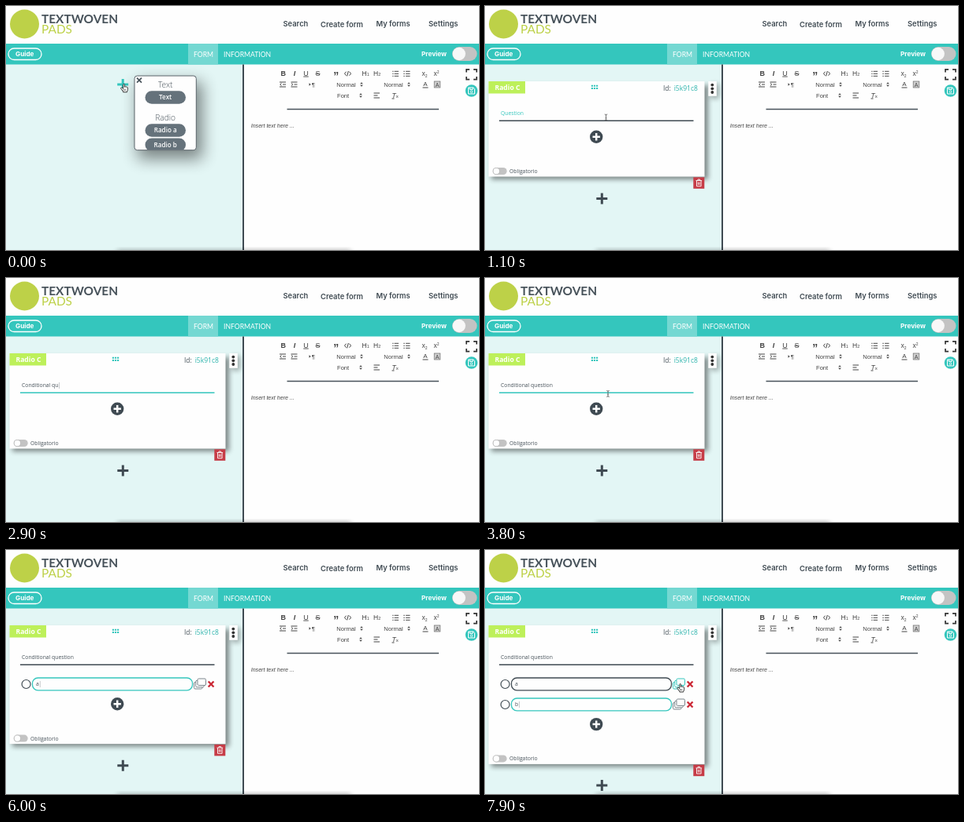
Recreate the animation shown at these times as an HTML page. Size 600 by 311 pixels, loop 8 s.

```html
<!DOCTYPE html>
<html lang="en">
<head>
<meta charset="utf-8">
<title>Form editor</title>
<style>
  html, body { margin: 0; width: 100%; height: 100%; overflow: hidden; background: #fefefe; }
  svg { display: block; width: 600px; height: 311px; }
  text { fill: #47525a; font-family: "Open Sans", sans-serif; white-space: pre; }
  .nav text { font: 600 9.4px Inter, sans-serif; fill: #3f4a52; }
  .bar text { fill: #fff; font-family: Lato, sans-serif; font-size: 8.6px; }
  .bar .bold { font: 700 8.2px Inter, sans-serif; }
  .tools text { font-family: "Liberation Sans", Arial, sans-serif; font-size: 7.6px; fill: #444; }
  .tools .mid { font-size: 9px; text-anchor: middle; }
  .tools path, #lines { fill: none; stroke: #444; stroke-width: 1; }
  .field { font-size: 6.8px; font-weight: 400; }
  .pill { fill: #fff; font: 600 8.1px "Open Sans", sans-serif; text-anchor: middle; }
  .group { font: 300 10.2px "Open Sans", sans-serif; text-anchor: middle; }
</style>
</head>
<body>
<svg viewBox="0 0 600 311" xmlns="http://www.w3.org/2000/svg">
  <defs>
    <filter id="soft" x="-50%" y="-50%" width="200%" height="200%"><feGaussianBlur stdDeviation="3"/></filter>
    <filter id="wide" x="-60%" y="-60%" width="220%" height="220%"><feGaussianBlur stdDeviation="10"/></filter>
    <clipPath id="menuClip"><rect x="163.5" y="89.5" width="77.5" height="93.7" rx="3"/></clipPath>
    <clipPath id="leftClip"><rect y="74" width="300" height="237"/></clipPath>
    <g id="hand">
      <path d="M-1.2,-4.4 q0,-1 .9,-1 t.9,1 V-1.6 q.8,-.8 1.5,0 q.9,-.6 1.4,.2 q1,-.3 1.1,.9 V1.6 q0,1.4 -.9,2.6 V5 H-1.2 V4.2 L-3.9,.6 q-.6,-1 .3,-1.4 q.8,-.2 1.5,.6 l.9,.8 Z" fill="#fff" stroke="#222" stroke-width=".9" stroke-linejoin="round"/>
      <path d="M.5,1 V3.4 M1.9,1 V3.4 M-.8,1 V3.4" stroke="#222" stroke-width=".5"/>
    </g>
    <path id="beam" d="M-1.7,-4 Q0,-4 0,-2.8 Q0,-4 1.7,-4 M0,-3 V3 M-1.7,4 Q0,4 0,2.8 Q0,4 1.7,4 M-.8,.8 H.8" fill="none" stroke="#555" stroke-width=".8"/>
    <g id="row">
      <circle cx="25.6" cy="171" r="5.5" fill="#fefefe" stroke="#3f4a52" stroke-width="1.2"/>
      <path d="M256.7,167.5 l6.8,7 m0,-7 l-6.8,7" stroke="#cb2936" stroke-width="2.3"/>
    </g>
    <g id="copy" fill="#fefefe" stroke-width="1">
      <rect x="238.5" y="168.5" width="10.5" height="8.5" rx="1.5"/>
      <rect x="240.7" y="166.3" width="10.5" height="8.5" rx="1.5"/>
      <rect x="243" y="164" width="10.5" height="8.5" rx="1.5"/>
    </g>
    <path id="sort" d="M-1.9,-.8 L0,-2.8 L1.9,-.8 Z M-1.9,.8 L0,2.8 L1.9,.8 Z" style="fill:#444;stroke:none"/>
    <path id="lines" d="M-1.4,-3 H4 M-1.4,0 H4 M-1.4,3 H4"/>
  </defs>

  <rect width="600" height="311" fill="#fefefe"/>
  <circle cx="23.5" cy="23" r="18.5" fill="#bdd148"/>
  <text x="45" y="22" style="font:700 15.4px Lato,sans-serif">TEXTWOVEN</text>
  <text x="45" y="35.2" style="font:400 15.4px Lato,sans-serif;fill:#bdd148">PADS</text>
  <g class="nav">
    <text x="351.5" y="25.7">Search</text>
    <text x="399" y="26.7">Create form</text>
    <text x="469.5" y="25.7">My forms</text>
    <text x="536" y="25.7">Settings</text>
  </g>

  <rect y="74" width="300" height="237" fill="#e3f6f5"/>
  <g class="bar">
    <rect y="48" width="600" height="26.5" fill="#34c6bd"/>
    <rect x="231" y="48" width="38" height="26.5" fill="#74d8d2"/>
    <rect x="3" y="54" width="42" height="14.5" rx="7.2" fill="none" stroke="#fff" stroke-width="1.3"/>
    <text class="bold" x="12" y="64.3">Guide</text>
    <text x="238" y="64.5">FORM</text>
    <text x="276" y="64.5">INFORMATION</text>
    <text class="bold" x="527" y="64.3">Preview</text>
    <rect x="566" y="52" width="31.5" height="18" rx="9" fill="#c3c3c3"/>
    <circle cx="574.7" cy="61" r="8.2" fill="#f8f8f8"/>
  </g>
  <rect x="300" y="74.5" width="2" height="237" fill="#3f4a52"/>

  <g class="tools">
    <text class="mid" x="351.7" y="89.3" font-weight="700">B</text>
    <text class="mid" x="366" y="89.3" font-style="italic" font-weight="700">I</text>
    <text class="mid" x="380.5" y="88.6" text-decoration="underline">U</text>
    <text class="mid" x="395.5" y="89.3" text-decoration="line-through">S</text>
    <text class="mid" x="418.7" y="93.5" style="font-size:14px;font-weight:700">”</text>
    <path d="M431.5,83.7 l-2,2.5 l2,2.5 M435.5,83.7 l2,2.5 l-2,2.5 M434.3,83 l-1.6,6.4"/>
    <text x="451.5" y="89.3" style="font-size:8.5px">H<tspan font-size="5.5">1</tspan></text>
    <text x="466" y="89.3" style="font-size:8.5px">H<tspan font-size="5.5">2</tspan></text>
    <use href="#lines" x="494" y="86.3"/>
    <use href="#lines" x="508.5" y="86.3"/>
    <path d="M490.2,83.3 h1.3 m-1.3,3 h1.3 m-1.3,3 h1.3 M504.3,83.3 h1.5 m-1.5,3 h1.5 m-1.5,3 h1.5"/>
    <text x="527.5" y="89" style="font-size:8.5px">x<tspan font-size="5" dy="1.5">2</tspan></text>
    <text x="542.5" y="89" style="font-size:8.5px">x<tspan font-size="5" dy="-3.5">2</tspan></text>
    <path d="M347,97 h8 m-4,3 h4 m-8,3 h8 M349.5,98.4 l-1.8,1.6 l1.8,1.6 M361.5,97 h8 m-4,3 h4 m-8,3 h8 M362,98.4 l1.8,1.6 l-1.8,1.6"/>
    <path d="M384.5,98.2 l2.2,1.8 l-2.2,1.8 Z" style="fill:#444;stroke:none"/>
    <text x="387.7" y="102.6" style="font-size:8px">¶</text>
    <text x="419.3" y="102.8">Normal</text><use href="#sort" x="451" y="100"/>
    <text x="479.3" y="102.8">Normal</text><use href="#sort" x="511" y="100"/>
    <text class="mid" x="532" y="102" style="font-size:8px">A</text><path d="M528.5,104 h7"/>
    <rect x="543.2" y="96" width="7.6" height="8" fill="#d0d0d0" stroke="#666" stroke-width=".7"/>
    <text class="mid" x="547" y="102.7" style="font-size:7px">A</text>
    <text x="420" y="116.8">Font</text><use href="#sort" x="450" y="114"/>
    <path d="M466.5,111 h7.5 m-7.5,3 h5 m-5,3 h7.5"/>
    <text x="489.5" y="117" font-style="italic" style="font-size:8.5px">T<tspan font-size="6" font-style="normal">x</tspan></text>
    <path d="M489.5,118 h3"/>
    <rect x="356.5" y="130.8" width="192.5" height="1.5" fill="#47525a"/>
    <text x="310.7" y="154.5" font-style="italic" style="font-size:7.1px">Insert text here ...</text>
    <path d="M584,84.5 v-3.7 h4 M593,80.8 h4 v3.7 M597,90 v3.7 h-4 M588,93.7 h-4 v-3.7" style="stroke:#333;stroke-width:1.7"/>
  </g>
  <circle cx="590.5" cy="108" r="7.8" fill="#34c6bd"/>
  <path d="M586.5,104 h6.3 l1.7,1.7 v6.3 h-8 Z M588.3,104 v2.4 h3.8 V104" fill="none" stroke="#fff"/>
  <circle cx="590.5" cy="109.3" r="1.3" fill="none" stroke="#fff" stroke-width=".8"/>

  <g id="menu">
    <path d="M148.2,93 v14 m-7,-7 h14" stroke="#34c6bd" stroke-width="3"/>
    <rect x="167" y="97" width="82" height="98" fill="#000" opacity=".46" filter="url(#wide)"/>
    <rect x="163" y="89" width="78.3" height="94.7" rx="3.5" fill="#fefefe" stroke="#5a646b"/>
    <g clip-path="url(#menuClip)"><g id="items"></g></g>
    <path d="M166,91.7 l6,6 m0,-6 l-6,6" stroke="#47525a" stroke-width="1.7"/>
  </g>

  <g id="card" clip-path="url(#leftClip)">
    <rect id="cardShade" x="8" y="101" width="275" fill="#000" opacity=".45" filter="url(#soft)"/>
    <rect x="286" y="99" width="11" height="19" fill="#000" opacity=".3" filter="url(#soft)"/>
    <rect id="cardBox" x="4.5" y="96" width="274" fill="#fefefe"/>
    <rect x="4.5" y="96" width="46.5" height="15.5" fill="#bdf05a"/>
    <text x="12.5" y="106.8" style="font:700 8.6px 'Open Sans',sans-serif;fill:#fff">Radio C</text>
    <path d="M134.8,101.8 h8.4 M134.8,105 h8.4" stroke="#34c6bd" stroke-width="2" stroke-dasharray="2.2 .9"/>
    <text x="226" y="107.6" style="font-size:8.4px">Id:</text>
    <text x="239.7" y="107.6" style="font-size:8.5px;fill:#2ab3ab">i5k91c8</text>
    <rect x="283.3" y="96" width="10.5" height="18.8" fill="#fefefe"/>
    <g fill="#333"><circle cx="288.3" cy="100.6" r="1.9"/><circle cx="288.3" cy="105.3" r="1.9"/><circle cx="288.3" cy="110" r="1.9"/></g>
    <text class="field" id="question" x="20" y="139.3"></text>
    <rect id="rule" x="18" y="145.5" width="246.5" height="1.5"/>
    <g id="rows"></g>
    <g id="lower">
      <circle id="addDot" cx="141.2" cy="166.7" r="8.2"/>
      <path d="M141.2,162 v9.4 m-4.7,-4.7 h9.4" stroke="#fff" stroke-width="2.5"/>
      <rect x="9.7" y="206" width="18" height="9" rx="4.5" fill="#c3c3c3"/>
      <circle cx="14.4" cy="210.5" r="4.1" fill="#fefefe" stroke="#aaa" stroke-width=".6"/>
      <text class="field" x="31" y="213">Obligatorio</text>
      <rect x="264.3" y="218.3" width="14" height="14.5" fill="#c63c47"/>
      <path d="M267.5,222.5 h7.6 M270,222.3 v-1.3 h2.6 v1.3 M268.5,222.7 v7 h5.6 v-7 M270.4,224.5 v3.5 M272.2,224.5 v3.5" fill="none" stroke="#fff" stroke-width=".9"/>
    </g>
    <path id="outer" d="M148.3,238.5 v14 m-7,-7 h14" stroke="#3f4a52" stroke-width="3"/>
  </g>

  <rect x="141" y="311" width="296" height="8" fill="#111" opacity=".3" filter="url(#soft)"/>
  <use id="pointer"/>
</svg>
<script>
const LOOP = 8000, STEP = 100;
const TEAL = "#34c6bd", DARK = "#3f4a52";
const $ = id => document.getElementById(id);
const set = (el, attrs) => { for (const k in attrs) el.setAttribute(k, attrs[k]); };
const show = (el, on) => set(el, { visibility: on ? "visible" : "hidden" });
const clamp = v => Math.max(0, Math.min(1, v));
const ease = v => v * v * (3 - 2 * v);
const span = (t, a, b) => ease(clamp((t - a) / (b - a)));

// time, x, y, shape from that time on
const track = [
  [0, 149.8, 104.8, "hand"], [400, 201, 168, "hand"], [700, 202, 172, "hand"],
  [800, 196, 168, "beam"], [1100, 153.5, 142, "beam"], [1400, 152, 139, "beam"],
  [1600, 152, 139, ""], [3600, 152, 139, "beam"], [3800, 156, 147.5, "beam"],
  [4200, 150, 162, "hand"], [4600, 148.5, 169, "hand"], [5000, 148.5, 169, "hand"],
  [5200, 142, 173, "beam"], [5500, 130, 172, "beam"], [5800, 130, 172, ""],
  [6300, 130, 172, "beam"], [6500, 137, 185, "hand"], [6700, 144, 198, "hand"],
  [6900, 144, 198, "beam"], [7200, 138, 197, "beam"], [7400, 138, 197, ""],
  [7500, 138, 197, "beam"], [7700, 222, 181, "hand"], [7800, 248, 176, "hand"], [LOOP, 248, 176, "hand"]
];
const offsets = [0, 29.6, 55.4];

const pill = (label, y) =>
  `<rect x="176.5" y="${y - 8.3}" width="51.5" height="16.6" rx="8.3" fill="#65727b"/>
   <text class="pill" x="202.2" y="${y + 2.9}">${label}</text>`;
const heading = (label, y) => `<text class="group" x="202.2" y="${y}">${label}</text>`;
$("items").innerHTML = heading("Text", 103.7) + pill("Text", 116.5) + heading("Radio", 145.7) +
  ["a", "b", "c"].map((s, i) => pill("Radio " + s, 158.5 + 18.4 * i)).join("");

const rows = [0, 26].map(dy => {
  const g = document.createElementNS("http://www.w3.org/2000/svg", "g");
  set(g, { transform: `translate(0 ${dy})` });
  g.innerHTML = `<use href="#row"/><rect x="33.5" y="163" width="203" height="15.8" rx="7" fill="#fefefe" stroke-width="1.3"/>
    <use href="#copy"/><text class="field" x="38" y="173.4"></text>`;
  $("rows").append(g);
  return { g, box: g.querySelector("rect"), icon: g.querySelectorAll("use")[1], label: g.querySelector("text") };
});

function typed(el, text, focused) {
  el.innerHTML = text + (focused ? '<tspan dx="-.5" font-weight="300">|</tspan>' : "");
}

function movePointer(t) {
  let i = 0;
  while (i < track.length - 2 && track[i + 1][0] <= t) i++;
  const [t0, x0, y0, shape] = track[i], [t1, x1, y1] = track[i + 1];
  const k = span(t, t0, t1);
  show($("pointer"), shape);
  set($("pointer"), { href: "#" + (shape || "beam"), x: x0 + (x1 - x0) * k, y: y0 + (y1 - y0) * k });
}

function draw(t) {
  const inMenu = t < 800;
  show($("menu"), inMenu);
  show($("card"), !inMenu);
  set($("items"), { transform: `translate(0 ${-24 * span(t, 300, 600)})` });

  const count = t < 5000 ? 0 : t < 6900 ? 1 : 2;
  const dy = offsets[count];
  const chars = Math.max(0, Math.floor((t - 1500) / 100));
  const asking = t >= 1400 && t < 4700;
  typed($("question"), chars ? "Conditional question".slice(0, chars) : "Question", asking && chars && t < 3600);
  $("question").style.fill = chars ? "#47525a" : TEAL;
  set($("rule"), { fill: asking ? TEAL : DARK });

  const focus = t >= 7200 ? 1 : t >= 5500 && t < 6800 ? 0 : -1;
  rows.forEach((r, i) => {
    show(r.g, !inMenu && i < count);
    set(r.box, { stroke: focus === i ? TEAL : DARK });
    set(r.icon, { stroke: i === 0 && t >= 7800 ? TEAL : "#7b858c" });
    typed(r.label, t >= [5900, 7400][i] ? "ab"[i] : "", focus === i);
  });

  set($("cardBox"), { height: 121.5 + dy });
  set($("cardShade"), { height: 120 + dy });
  set($("lower"), { transform: `translate(0 ${dy})` });
  set($("outer"), { transform: `translate(0 ${dy - count * .4})` });
  const hover = t >= 4300 && t < 5000 || t >= 6600 && t < 6900;
  set($("addDot"), { fill: hover ? TEAL : DARK });
  movePointer(t);
}

function frame(now) {
  draw(Math.floor((now % LOOP) / STEP) * STEP);
  requestAnimationFrame(frame);
}
draw(0);
requestAnimationFrame(frame);
</script>
</body>
</html>
```
